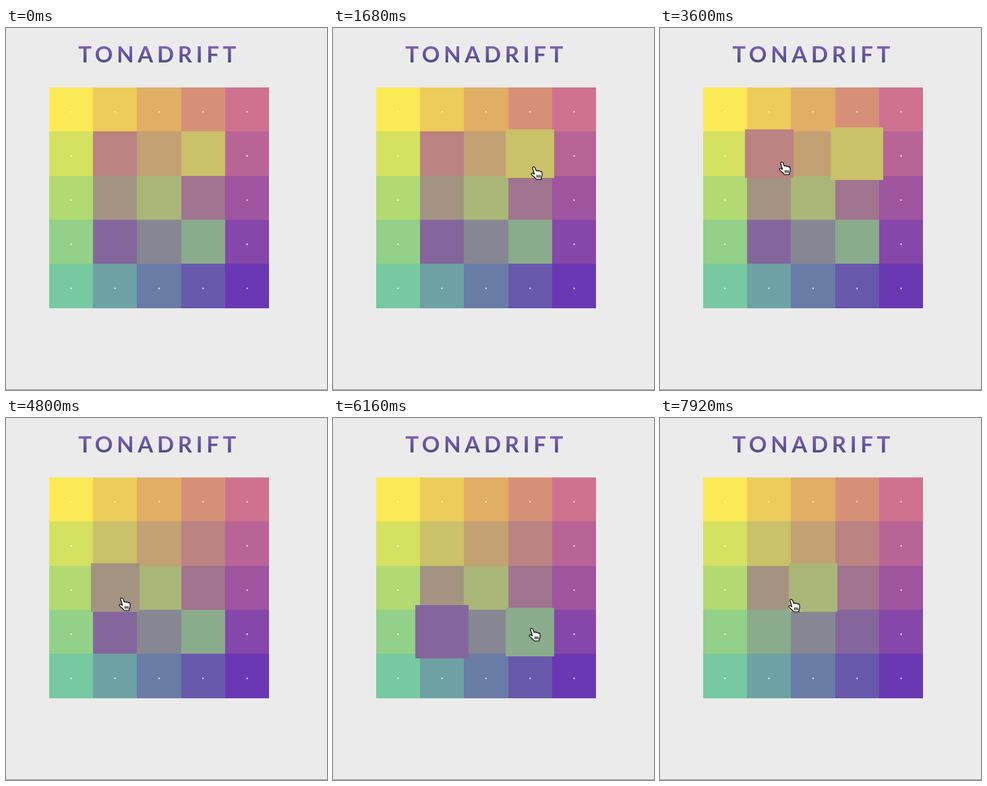
These frames come from a looping animation (476 px wide and 536 px high, 8000 ms). An HTML page with a canvas:

```html
<!DOCTYPE html>
<html lang="en">
<head>
<meta charset="utf-8">
<title>Colour puzzle</title>
<style>
html, body { margin: 0; width: 100%; height: 100%; overflow: hidden; background: #ebebeb; }
canvas { position: absolute; left: 0; top: 0; }
h1 {
  position: absolute; left: 0; top: 21.7px; width: 448.5px; margin: 0; z-index: 1;
  font: 700 33px/1 Lato, "Open Sans", sans-serif; letter-spacing: 5.7px; text-indent: 5.7px;
  text-align: center; white-space: nowrap; color: transparent;
  background: linear-gradient(#7e60b6 5px, #494b84 30px);
  -webkit-background-clip: text; background-clip: text;
}
</style>
</head>
<body>
<h1>TONADRIFT</h1>
<canvas id="stage" width="476" height="536"></canvas>
<script>
const ctx = document.getElementById('stage').getContext('2d');
const LOOP = 8000, EASE = 250, SAMPLES = 24;
const LEFT = 63.7, TOP = 87.8, CELL_W = 65.3, CELL_H = 65.4;

// Corner, edge-middle and centre colours; the rest is interpolated
const keys = [
  ['#fbea55', '#e1ae66', '#cf728f'],
  ['#b2d972', '#a39482', '#9f559f'],
  ['#76c9a1', '#697ba7', '#6a38b3'],
];

const channel = (hex, n) => parseInt(hex.slice(1 + 2 * n, 3 + 2 * n), 16);

// Quadratic through a, b, c at u = 0, 1/2, 1
const curve = ([a, b, c], u) =>
  a * (1 - u) * (1 - 2 * u) + 4 * b * u * (1 - u) + c * u * (2 * u - 1);

function gridColor(i) {
  const u = i % 5 / 4, v = Math.floor(i / 5) / 4;
  const rgb = [0, 1, 2].map(n =>
    Math.round(curve(keys.map(row => curve(row.map(hex => channel(hex, n)), u)), v)));
  return `rgb(${rgb})`;
}

function swapTiles(list, [a, b]) {
  [list[a], list[b]] = [list[b], list[a]];
}

const colors = Array.from({ length: 25 }, (_, i) => gridColor(i));
[[6, 8], [11, 12], [16, 18]].forEach(pair => swapTiles(colors, pair));

// First click picks a tile, second click swaps it with another
const swaps = [
  { pick: 1920, drop: 3680, pair: [8, 6] },
  { pick: 5100, drop: 6200, pair: [16, 18] },
];

// Pointer moves: start time, end time, goal x, goal y
const moves = [
  [620, 1440, 298, 206], [1680, 2080, 304, 206], [2600, 3380, 181, 199],
  [4440, 4760, 172, 267], [4820, 5080, 170, 315], [5360, 6000, 295, 312],
  [6480, 6880, 292, 312], [7280, 7800, 195, 269],
];

function pointer(t) {
  let x = -20, y = 300;
  for (const [from, to, goalX, goalY] of moves) {
    const u = Math.min(1, Math.max(0, (t - from) / (to - from)));
    const k = u * u * (3 - 2 * u);
    x += (goalX - x) * k;
    y += (goalY - y) * k;
  }
  return [x, y];
}

const isInner = (col, row) => col > 0 && col < 4 && row > 0 && row < 4;

function hovered(t) {
  const [x, y] = pointer(t);
  const col = Math.floor((x - LEFT) / CELL_W), row = Math.floor((y - TOP) / CELL_H);
  return isInner(col, row) ? row * 5 + col : -1;
}

// Each tile eases to its hover or picked size: a weighted mean of recent targets
function tileScales(t) {
  const scales = Array(25).fill(1);
  for (let i = 0; i < SAMPLES; i++) {
    const u = (i + 0.5) / SAMPLES, past = t - u * EASE;
    const weight = 2 * (1 - u) / SAMPLES;
    const swap = swaps.find(s => past >= s.pick && past < s.drop);
    const picked = swap ? swap.pair[0] : -1, hover = hovered(past);
    if (picked >= 0) scales[picked] += 0.2 * weight;
    if (hover >= 0 && hover !== picked) scales[hover] += 0.1 * weight;
  }
  return scales;
}

function drawTile(i, scale, color) {
  const col = i % 5, row = Math.floor(i / 5);
  const cx = LEFT + (col + 0.5) * CELL_W, cy = TOP + (row + 0.5) * CELL_H;
  const w = CELL_W * scale / 2, h = CELL_H * scale / 2;
  const x = Math.round(cx - w), y = Math.round(cy - h);
  ctx.fillStyle = color;
  ctx.fillRect(x, y, Math.round(cx + w) - x, Math.round(cy + h) - y);
  if (isInner(col, row)) return;
  ctx.fillStyle = '#fff';
  ctx.beginPath();
  ctx.arc(cx, cy + 3.5, 1.1, 0, 2 * Math.PI);
  ctx.fill();
}

const hand = new Path2D('M-2 1.5C-2.5-.8.5-1.2 1.4.8L3.4 5.6C4 4.6 5.8 4.6 6.4 6 ' +
  '7.3 5 8.8 5.4 9.3 6.8 10.4 6 11.8 6.6 12 8.4 12.5 11.5 12.2 13.5 11 15.4L10.7 18H3.4' +
  'C1.4 15-1.6 13.6-3.6 11-4.6 9.3-2.8 8-1 9.4L.6 10.4Z');
const creases = new Path2D('M4.6 11.5V15.5M6.8 11.5V15.5M9 11.5V15.5');
const arrow = new Path2D('M0 0V15.5L3.6 12.2 6 18 8.6 17 6.2 11.3H11Z');

function drawPointer(t) {
  const over = hovered(t) >= 0, shape = over ? hand : arrow;
  ctx.save();
  ctx.translate(...pointer(t));
  ctx.lineJoin = 'round';
  ctx.lineWidth = 1.2;
  ctx.fillStyle = over ? '#fff' : '#000';
  ctx.strokeStyle = over ? '#000' : '#fff';
  ctx.fill(shape);
  ctx.stroke(shape);
  if (over) ctx.stroke(creases);
  ctx.restore();
}

function draw(t) {
  ctx.fillStyle = '#ebebeb';
  ctx.fillRect(0, 0, 476, 536);
  ctx.fillStyle = '#999';
  ctx.fillRect(0, 535, 476, 1);

  const now = [...colors];
  swaps.filter(s => t >= s.drop).forEach(s => swapTiles(now, s.pair));
  const scales = tileScales(t);
  [...scales.keys()]
    .sort((i, j) => scales[i] - scales[j])
    .forEach(i => drawTile(i, scales[i], now[i]));
  drawPointer(t);
}

const start = performance.now();
function frame() {
  draw((performance.now() - start) % LOOP);
  requestAnimationFrame(frame);
}
frame();
</script>
</body>
</html>
```
